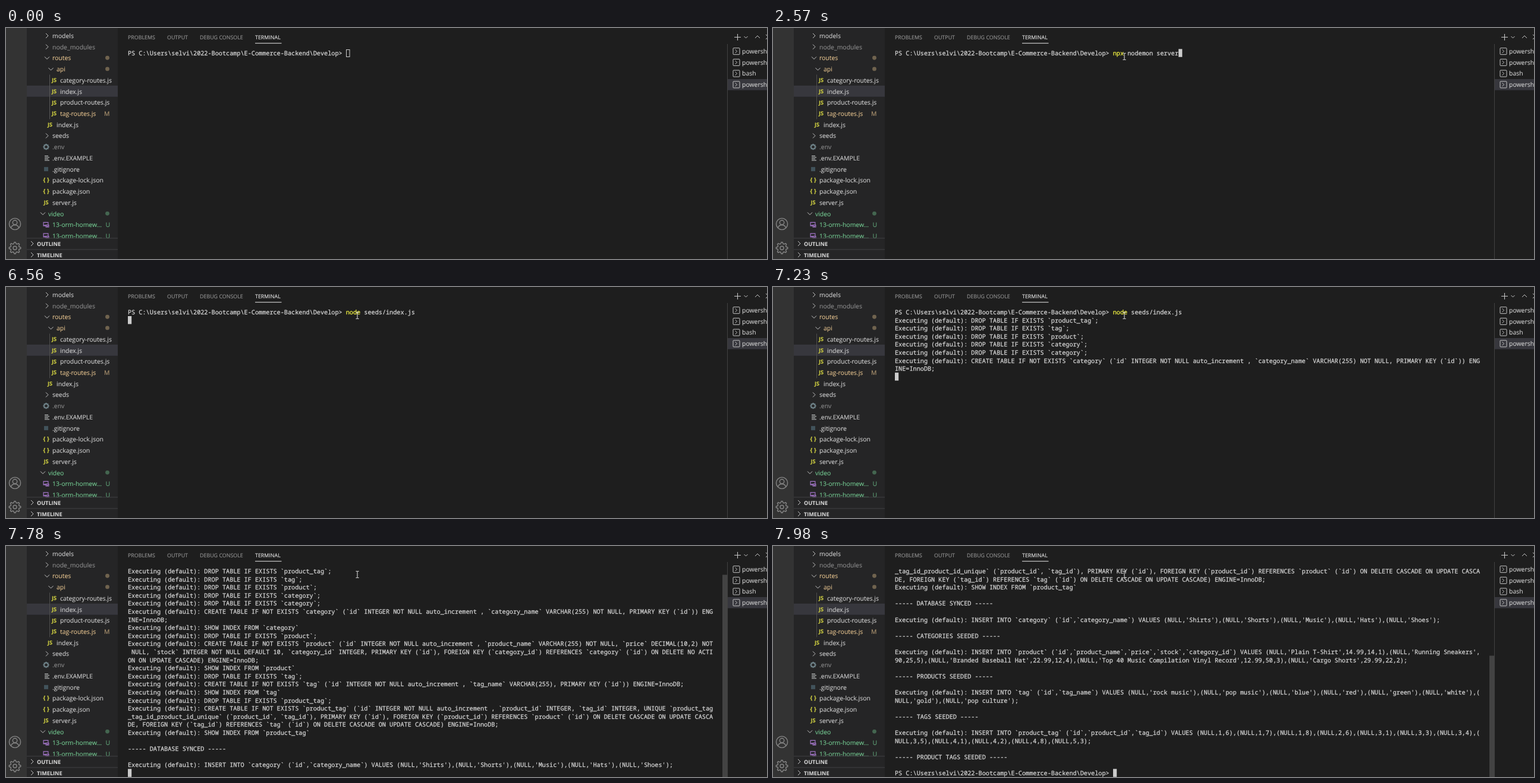
Animation of 1280 by 389 pixels, one loop 8 s. Source, as an HTML page:

```html
<!DOCTYPE html>
<html lang="en">
<head>
<meta charset="utf-8">
<title>Terminal</title>
<style>
  html, body { margin: 0; width: 100%; height: 100%; overflow: hidden; background: #1e1e1e; }
  svg { display: block; width: 1280px; height: 389px; }
  text { white-space: pre; text-rendering: geometricPrecision; color: #d0d0d0; }
  text, tspan { fill: currentColor; stroke: currentColor; stroke-width: 0.12px; }
  .ui { font: 10.45px "Open Sans", "Noto Sans", sans-serif; }
  .tab { font: 8.9px "Open Sans", "Noto Sans", sans-serif; }
  .head { font: bold 9.1px "Open Sans", "Noto Sans", sans-serif; }
  .term { font: 10.195px "Noto Sans Mono", "DejaVu Sans Mono", monospace; color: #d6d6d6; }
  .term, .term tspan { stroke-width: 0.25px; }
</style>
</head>
<body>
<svg id="stage" viewBox="0 0 1280 389" xmlns="http://www.w3.org/2000/svg"></svg>
<script>
const NS = 'http://www.w3.org/2000/svg';
const stage = document.getElementById('stage');
const LOOP = 8000;

function add(tag, attrs, parent = stage) {
  const el = document.createElementNS(NS, tag);
  for (const k in attrs) el.setAttribute(k, attrs[k]);
  parent.appendChild(el);
  return el;
}
const rect = (x, y, width, height, fill) => add('rect', { x, y, width, height, fill });
const line = (d, stroke = '#c5c5c5', width = 1) =>
  add('path', { d, stroke, 'stroke-width': width, fill: 'none' });
const ring = (cx, cy, r, stroke, width) =>
  add('circle', { cx, cy, r, stroke, 'stroke-width': width, fill: 'none' });

function label(x, y, str, cls, color) {
  const el = add('text', { x, y, class: cls });
  if (color) el.style.color = color;
  el.textContent = str;
  return el;
}

function symbol(x, y, str, size, color) {
  const el = label(x, y, str, 'ui', color);
  el.style.fontSize = size + 'px';
  el.style.fontWeight = 'bold';
}

function chevron(x, y, dir) {
  const d = { right: 'm-2 -4 4 4 -4 4', down: 'm-4 -2 4 4 4 -4', up: 'm-4 2 4 -4 4 4' }[dir];
  line(`M${x} ${y}${d}`);
}

// Outline of an eight-toothed wheel
function gear(x, y, r, color, width) {
  const points = [];
  for (let i = 0; i < 32; i++) {
    const a = (i - 0.5) * Math.PI / 16;
    const d = i % 4 < 2 ? r : r * 0.75;
    points.push(`${x + d * Math.cos(a)} ${y + d * Math.sin(a)}`);
  }
  line(`M${points.join('L')}Z`, color, width);
}

// Sidebar
const TAN = '#e2c08d', GREEN = '#73c991', DIM = '#8c8c8c', YELLOW = '#cbcb41';
const PITCH = 18.72;

const icons = {
  right: (x, y) => chevron(x + 1, y, 'right'),
  down: (x, y) => chevron(x, y, 'down'),
  js: (x, y) => symbol(x - 4.5, y + 3.2, 'JS', 9.2, YELLOW),
  json: (x, y) => symbol(x - 5.5, y + 3, '{ }', 9.8, YELLOW),
  gear: (x, y) => gear(x, y, 4.2, '#6d8086', 1.8),
  list: (x, y) => line(`M${x - 3} ${y - 3.5}h6M${x - 3} ${y - 1}h8M${x - 3} ${y + 1.5}h6M${x - 3} ${y + 4}h8`, '#d4d7d6'),
  square: (x, y) => rect(x - 3.5, y - 3.5, 7, 7, '#41535b'),
  image: (x, y) => {
    rect(x - 5, y - 4.5, 9, 7, '#a074c4');
    rect(x - 3.8, y - 3.2, 6.6, 3.6, '#252526');
    rect(x - 1, y, 6, 4.5, '#a074c4');
    line(`M${x} ${y + 3}l2 -2 2 2`, '#252526');
  }
};

// icon, icon x, text x, name, colour, badge
const files = [
  ['right', 68, 78, 'models'],
  ['right', 68, 78, 'node_modules', DIM],
  ['down', 69, 78, 'routes', TAN, '•'],
  ['down', 75.5, 85, 'api', TAN, '•'],
  ['js', 81.5, 91, 'category-routes.js'],
  ['js', 81.5, 91, 'index.js'],
  ['js', 81.5, 91, 'product-routes.js'],
  ['js', 81.5, 91, 'tag-routes.js', TAN, 'M'],
  ['js', 74.5, 85, 'index.js'],
  ['right', 68, 78, 'seeds'],
  ['gear', 67.5, 78, '.env', DIM],
  ['list', 68, 78, '.env.EXAMPLE'],
  ['square', 67.5, 78, '.gitignore'],
  ['json', 68, 78, 'package-lock.json'],
  ['json', 68, 78, 'package.json'],
  ['js', 68, 78, 'server.js'],
  ['down', 62, 71, 'video', GREEN, '•'],
  ['image', 67.5, 78, '13-orm-homew...', GREEN, 'U'],
  ['image', 67.5, 78, '13-orm-homew...', GREEN, 'U']
];

rect(0, 0, 1280, 389, '#1e1e1e');
rect(0, 0, 35, 389, '#333333');
rect(35, 0, 153, 389, '#252526');
rect(35, 97, 153, PITCH, '#37373d');
const guide = rect(73, 78.5, 1, 75, '#585858');

files.forEach(([icon, ix, tx, name, color, badge], i) => {
  const y = 13 + i * PITCH;
  icons[icon](ix, y);
  label(tx, y + 4, name, 'ui', color);
  if (badge === '•') add('circle', { cx: 170.5, cy: y - 0.2, r: 3.4, fill: color, opacity: 0.4 });
  else if (badge) label(badge === 'M' ? 165 : 167.5, y + 3.7, badge, 'ui', color).style.opacity = 0.75;
});

rect(35, 354, 153, 35, '#252526');
[['OUTLINE', 363], ['TIMELINE', 382]].forEach(([name, y]) => {
  rect(35, y - 9.5, 153, 1, '#434344');
  chevron(44, y, 'right');
  label(52, y + 3.6, name, 'head');
});

// Activity bar
const GREY = '#858585';
ring(15, 330, 9.6, GREY, 1.4);
ring(15, 327.5, 3.7, GREY, 1.4);
line('M8.5 337c1 -7 12 -7 13 0', GREY, 1.4);
gear(15, 370.5, 9.8, GREY, 1.4);
ring(15, 370.5, 3, GREY, 1.4);

// Panel header and terminal list
[[205, 'PROBLEMS'], [271, 'OUTPUT'], [326, 'DEBUG CONSOLE'], [419, 'TERMINAL']].forEach(([x, name], i) =>
  label(x, 18.8, name, 'tab', i === 3 ? '#e7e7e7' : '#969696'));
rect(419, 25.2, 44.5, 1, '#e7e7e7');
line('M1225 15.5h11M1230.5 10v11', '#c5c5c5', 1.1);
line('M1241.5 14l3 3 3 -3');
chevron(1264, 15, 'up');
line('M1278 11l8 8M1278 19l8 -8');
rect(1213, 27, 1, 362, '#414141');
rect(1214, 86, 66, PITCH, '#37373d');
['powershell', 'powershell', 'bash', 'powershell'].forEach((name, i) => {
  const y = 39.2 + i * PITCH;
  add('rect', { x: 1223, y: y - 5.5, width: 11, height: 11, rx: 1, fill: 'none', stroke: '#c5c5c5' });
  line(`M1226.5 ${y - 3}l3 3 -3 3`);
  label(1238, y + 3.8, name, 'ui');
});

// Terminal contents
const COLS = 161, ROWS = 26, CELL = 6.117, ROW_H = 13.6, LEFT = 205, TOP = 35.4;
const PROMPT = 'PS C:\\Users\\selvi\\2022-Bootcamp\\E-Commerce-Backend\\Develop> ';
const ID = '(`id` INTEGER NOT NULL auto_increment , ';
const KEY = 'PRIMARY KEY (`id`)';
const drop = t => `DROP TABLE IF EXISTS \`${t}\`;`;
const show = t => `SHOW INDEX FROM \`${t}\``;
const create = (t, body) => `CREATE TABLE IF NOT EXISTS \`${t}\` ${ID}${body}) ENGINE=InnoDB;`;
const foreign = (t, rule) => `FOREIGN KEY (\`${t}_id\`) REFERENCES \`${t}\` (\`id\`) ON DELETE ${rule} ON UPDATE CASCADE`;
const insert = (t, cols, rows) =>
  `INSERT INTO \`${t}\` (${['id', ...cols].map(c => '`' + c + '`').join()}) VALUES ${rows.map(r => `(NULL,${r})`).join()};`;
const quote = words => words.split(',').map(w => `'${w}'`);

const output = [];
function run(sql) {
  const text = 'Executing (default): ' + sql;
  for (let i = 0; i < text.length; i += COLS) output.push(text.slice(i, i + COLS));
}
const note = what => output.push('', `----- ${what} -----`, '');

['product_tag', 'tag', 'product', 'category', 'category'].forEach(t => run(drop(t)));
run(create('category', '`category_name` VARCHAR(255) NOT NULL, ' + KEY));
run(show('category'));
run(drop('product'));
run(create('product', '`product_name` VARCHAR(255) NOT NULL, `price` DECIMAL(10,2) NOT NULL, ' +
  '`stock` INTEGER NOT NULL DEFAULT 10, `category_id` INTEGER, ' + KEY + ', ' + foreign('category', 'NO ACTION')));
run(show('product'));
run(drop('tag'));
run(create('tag', '`tag_name` VARCHAR(255), ' + KEY));
run(show('tag'));
run(drop('product_tag'));
run(create('product_tag', '`product_id` INTEGER, `tag_id` INTEGER, ' +
  'UNIQUE `product_tag_tag_id_product_id_unique` (`product_id`, `tag_id`), ' + KEY + ', ' +
  foreign('product', 'CASCADE') + ', ' + foreign('tag', 'CASCADE')));
run(show('product_tag'));
note('DATABASE SYNCED');
run(insert('category', ['category_name'], quote('Shirts,Shorts,Music,Hats,Shoes')));
note('CATEGORIES SEEDED');
run(insert('product', ['product_name', 'price', 'stock', 'category_id'], [
  "'Plain T-Shirt',14.99,14,1", "'Running Sneakers',90,25,5", "'Branded Baseball Hat',22.99,12,4",
  "'Top 40 Music Compilation Vinyl Record',12.99,50,3", "'Cargo Shorts',29.99,22,2"]));
note('PRODUCTS SEEDED');
run(insert('tag', ['tag_name'], quote('rock music,pop music,blue,red,green,white,gold,pop culture')));
note('TAGS SEEDED');
run(insert('product_tag', ['product_id', 'tag_id'],
  '1,6 1,7 1,8 2,6 3,1 3,3 3,4 3,5 4,1 4,2 4,8 5,3'.split(' ')));
note('PRODUCT TAGS SEEDED');

// time, row of the cursor, command, arguments
const SEED = ['node', ' seeds/index.js'];
const steps = [
  [0, 0, '', ''],
  [2020, 0, 'clear', ''],
  [2570, 0, 'npx', ' nodemon server'],
  [4890, 0, ...SEED],
  ...[[6560, 1], [7090, 3], [7160, 6], [7230, 8], [7300, 10], [7370, 14], [7440, 18],
    [7510, 21], [7710, 22], [7780, 26], [7910, 36], [7980, 44]].map(s => [...s, ...SEED])
];

// time, x, y, shape
const moves = [
  [0, 0, 0, ''],
  [200, 1034, 273, 'beam'], [265, 643, 16, 'arrow'], [330, 0, 0, ''],
  [540, 560, 0, 'arrow'], [610, 565, 13, 'arrow'], [680, 571, 25, 'arrow'],
  [750, 577, 37, 'beam'], [810, 583, 42, 'beam'], [880, 588, 46, 'beam'], [950, 591, 48, 'beam'],
  [1090, 594, 48, 'beam'], [1160, 597, 48, 'beam'], [1290, 593, 48, 'beam'], [1360, 591, 48, 'beam']
];

const slider = rect(1205, 0, 8, 0, '#434343');
const rows = Array.from({ length: ROWS }, (_, i) => label(LEFT, TOP + 10.5 + i * ROW_H, '', 'term'));
const block = rect(0, 0, 6.2, 13.4, '#cccccc');
const box = add('rect', { x: 572.5, y: 36.5, width: 5.5, height: 12, fill: 'none', stroke: '#cccccc' });
const pointers = {
  beam: add('path', { d: 'M-2.5 -5.5h2l.5 .5 .5 -.5h2M0 -5v10M-2.5 5.5h2l.5 -.5 .5 .5h2', stroke: '#e8e8e8', fill: 'none' }),
  arrow: add('path', { d: 'M0 0v13l3 -3 2 4.5 2 -1 -2 -4.3h4z', fill: '#ffffff', stroke: '#000000', 'stroke-width': 0.6 })
};

const visible = (el, on) => el.setAttribute('visibility', on ? 'visible' : 'hidden');
const at = (table, t) => table.findLastIndex(s => s[0] <= t);

function writeRow(el, parts) {
  el.textContent = '';
  parts.forEach((str, i) => {
    if (!str) return;
    const span = add('tspan', {}, el);
    if (i === 1) span.style.color = '#f5f543';
    span.textContent = str;
  });
}

function drawTerminal([, cur, cmd, args]) {
  const lines = [[PROMPT, cmd, args], ...output.map(s => [s])].slice(0, cur + 1);
  if (cur > 0) lines[cur] = cur > output.length ? [PROMPT] : [''];
  const top = Math.max(0, cur + 1 - ROWS);
  rows.forEach((el, i) => writeRow(el, lines[top + i] || []));
  block.setAttribute('x', LEFT + lines[cur].join('').length * CELL);
  block.setAttribute('y', TOP + (cur - top) * ROW_H);
  const track = 389 - TOP;
  visible(slider, top > 0);
  slider.setAttribute('y', TOP + track * top / (cur + 1));
  slider.setAttribute('height', track * ROWS / (cur + 1));
}

function drawPointer([, x, y, shape]) {
  for (const k in pointers) {
    visible(pointers[k], k === shape);
    pointers[k].setAttribute('transform', `translate(${x} ${y})`);
  }
}

let lastStep = -1, lastMove = -1;
function render(t) {
  const s = at(steps, t), m = at(moves, t);
  if (s !== lastStep) drawTerminal(steps[lastStep = s]);
  if (m !== lastMove) drawPointer(moves[lastMove = m]);
  const focused = t >= 1090;
  visible(box, !focused);
  visible(block, focused && !(t >= 2020 && t < 2090));
  guide.setAttribute('fill', focused ? '#4e4e4e' : '#585858');
}

const start = performance.now();
function tick() {
  render((performance.now() - start) % LOOP);
  requestAnimationFrame(tick);
}
tick();
</script>
</body>
</html>
```
